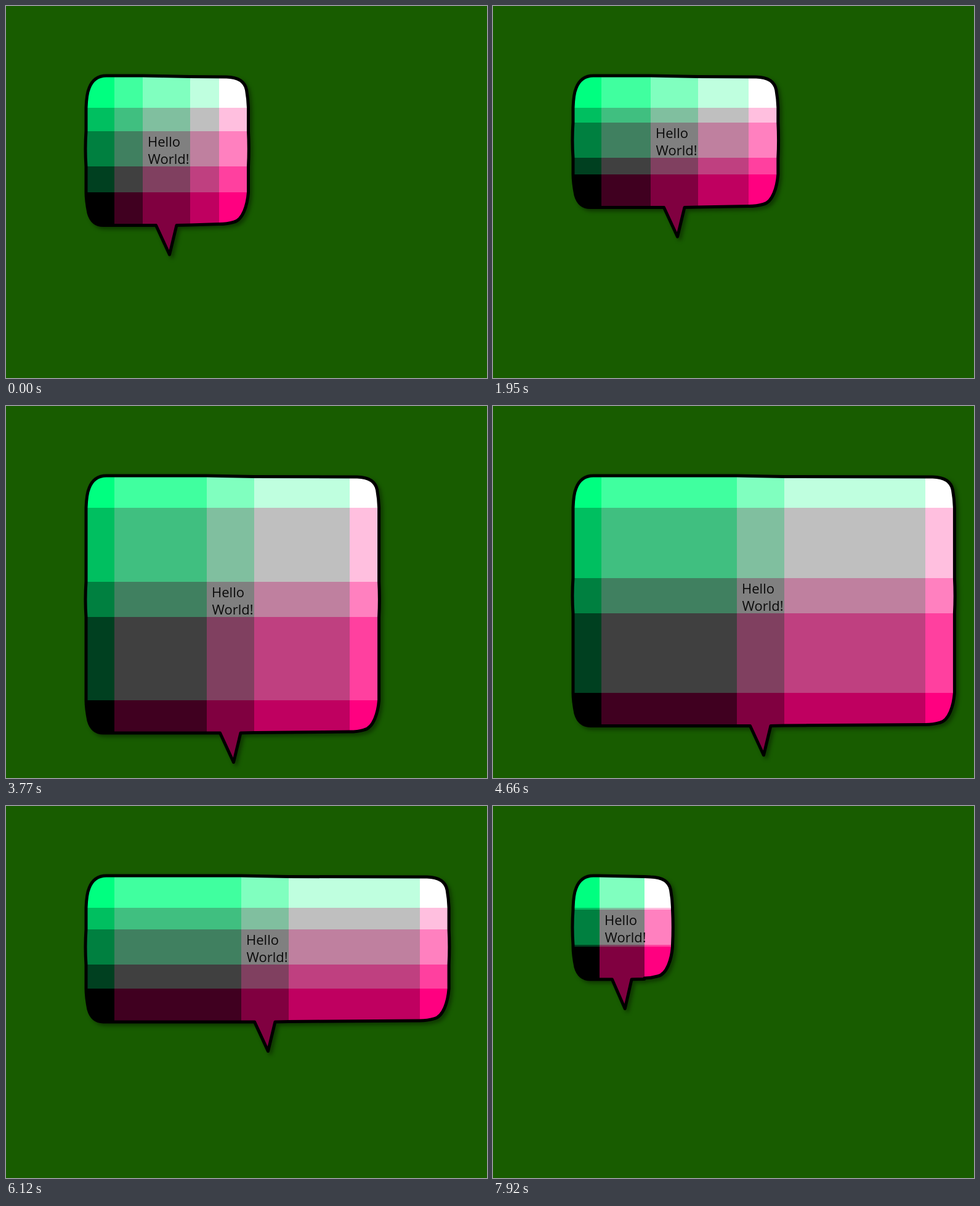
An HTML page that plays this animation: 781 px wide and 603 px high, repeating every 7990 ms.

```html
<!DOCTYPE html>
<html lang="en">
<head>
<meta charset="utf-8">
<title>Resizing speech bubble</title>
<style>
  html, body { margin: 0; width: 100%; height: 100%; overflow: hidden; background: #185c00; }
  svg { display: block; width: 781px; height: 603px; }
  #bubble { filter: drop-shadow(4px 4px 3px rgba(0, 0, 0, .4)); }
  #outline { fill: none; stroke: #000; stroke-width: 5; stroke-linejoin: round; }
  text { font: 22px "Open Sans", "Noto Sans", sans-serif; fill: #0a0a0a; }
</style>
</head>
<body>
<svg viewBox="0 0 781 603">
  <clipPath id="clip"><path id="shape"/></clipPath>
  <g id="bubble">
    <g id="cells" clip-path="url(#clip)" shape-rendering="crispEdges"></g>
    <path id="outline"/>
  </g>
  <text id="line1">Hello</text>
  <text id="line2">World!</text>
</svg>
<script>
const LOOP = 7990;

// turning points of the dragged corner: time, right edge, bottom edge
const keys = [
  [980, 396, 357.5], [1398, 504, 444], [1620, 575, 402], [2050, 440, 318],
  [2720, 384, 342], [3490, 497, 500], [3764, 608, 532], [4400, 731, 546],
  [5499, 772, 410], [6120, 722, 352], [6744, 497, 331], [7400, 335, 295],
  [7921, 294, 283]
];
// two drags with a short rest between them
const drags = [
  { start: 1050, step: 69.6, last: 47 },
  { start: 4530, step: 69.2, last: 49 }
];

const $ = id => document.getElementById(id);
const cells = [];
for (let row = 0; row < 5; row++) {
  for (let col = 0; col < 5; col++) {
    const rect = document.createElementNS("http://www.w3.org/2000/svg", "rect");
    const u = col / 4, v = 1 - row / 4;
    rect.setAttribute("fill", `rgb(${Math.round(255 * u)},${Math.round(255 * v)},${Math.round(127.5 * (u + v))})`);
    $("cells").append(rect);
    cells.push({ rect, row, col });
  }
}

function set(el, attrs) {
  for (const name in attrs) el.setAttribute(name, attrs[name]);
}

function slope(i, n) {
  const p = keys[Math.max(i - 1, 0)], q = keys[Math.min(i + 1, keys.length - 1)];
  return (q[n] - p[n]) / (q[0] - p[0]);
}

// smooth curve through the keys
function sample(t, n) {
  let i = 0;
  while (i < keys.length - 2 && t >= keys[i + 1][0]) i++;
  const p = keys[i], q = keys[i + 1], span = q[0] - p[0];
  const s = Math.min(Math.max((t - p[0]) / span, 0), 1), s2 = s * s, s3 = s2 * s;
  return (2 * s3 - 3 * s2 + 1) * p[n] + (s3 - 2 * s2 + s) * span * slope(i, n)
    + (3 * s2 - 2 * s3) * q[n] + (s3 - s2) * span * slope(i + 1, n);
}

function stepped(t) {
  const drag = drags.filter(d => t >= d.start).pop();
  if (!drag) return 0;
  const n = Math.floor((t - drag.start) / drag.step + .2);
  return drag.start + drag.step * Math.min(n, drag.last);
}

function columns(right) {
  const squeeze = Math.max(303 - right, 0);
  const gap = Math.max((right - 303) / 2.037, 0);
  const x0 = 176 - squeeze / 3, x1 = x0 + gap, x2 = x1 + 77 - squeeze * 4 / 9;
  return [120, x0, x1, x2, x2 + gap * 1.037, right + 10];
}

function rows(bottom) {
  const gap = Math.max((bottom - 277.5) / 2.125, 0);
  const y1 = 165 + gap, y2 = y1 + 57;
  return [100, 165, y1, y2, y2 + gap * 1.125, bottom + 70];
}

function outline(xs, ys, R, B) {
  const [, , a, b, c] = xs, [, y0, y1, y2, y3] = ys;
  const mid = (y1 + y2) / 2, k = (b - a) / 77, side = R - 2.5;
  return `M163 113 L${a} 113 L${b} 114.5 L${R - 38} 115
    C${R - 18} 115.5 ${R - 8} 123 ${R - 5.5} 136 Q${R - 3} 150 ${side} ${y0}
    L${side} ${y1} Q${R - 1} ${mid} ${side} ${y2} L${side} ${y3}
    C${R - 4} ${B - 36} ${R - 11} ${B - 10} ${R - 27} ${B - 7}
    Q${R - 37} ${B - 4} ${c} ${B - 4} L${b} ${B - 2.5}
    L${a + 55 * k} ${B - 2} L${a + 43.5 * k} ${B + 45.5} L${a + 21.5 * k} ${B - 2} L158 ${B - 2}
    C146 ${B - 2} 138 ${B - 8} 134 ${B - 22} C132 ${B - 32} 130 ${B - 45} 130 ${y3}
    L130 ${y2} Q128 ${mid} 130 ${y1} L130 ${y0}
    C130.5 150 132 140 135 133 C140 120 150 113 163 113Z`;
}

function draw(t) {
  const time = stepped(t), R = sample(time, 1), B = sample(time, 2);
  const xs = columns(R).map(Math.round), ys = rows(B).map(Math.round);
  for (const { rect, row, col } of cells) {
    set(rect, {
      x: xs[col], y: ys[row],
      width: xs[col + 1] - xs[col], height: ys[row + 1] - ys[row]
    });
  }
  const d = outline(xs, ys, R, B);
  set($("shape"), { d });
  set($("outline"), { d });
  set($("line1"), { x: xs[2] + 8, y: ys[2] + 25 });
  set($("line2"), { x: xs[2] + 8.5, y: ys[2] + 53 });
}

const begin = performance.now();
function frame() {
  draw((performance.now() - begin) % LOOP);
  requestAnimationFrame(frame);
}
frame();
</script>
</body>
</html>
```
